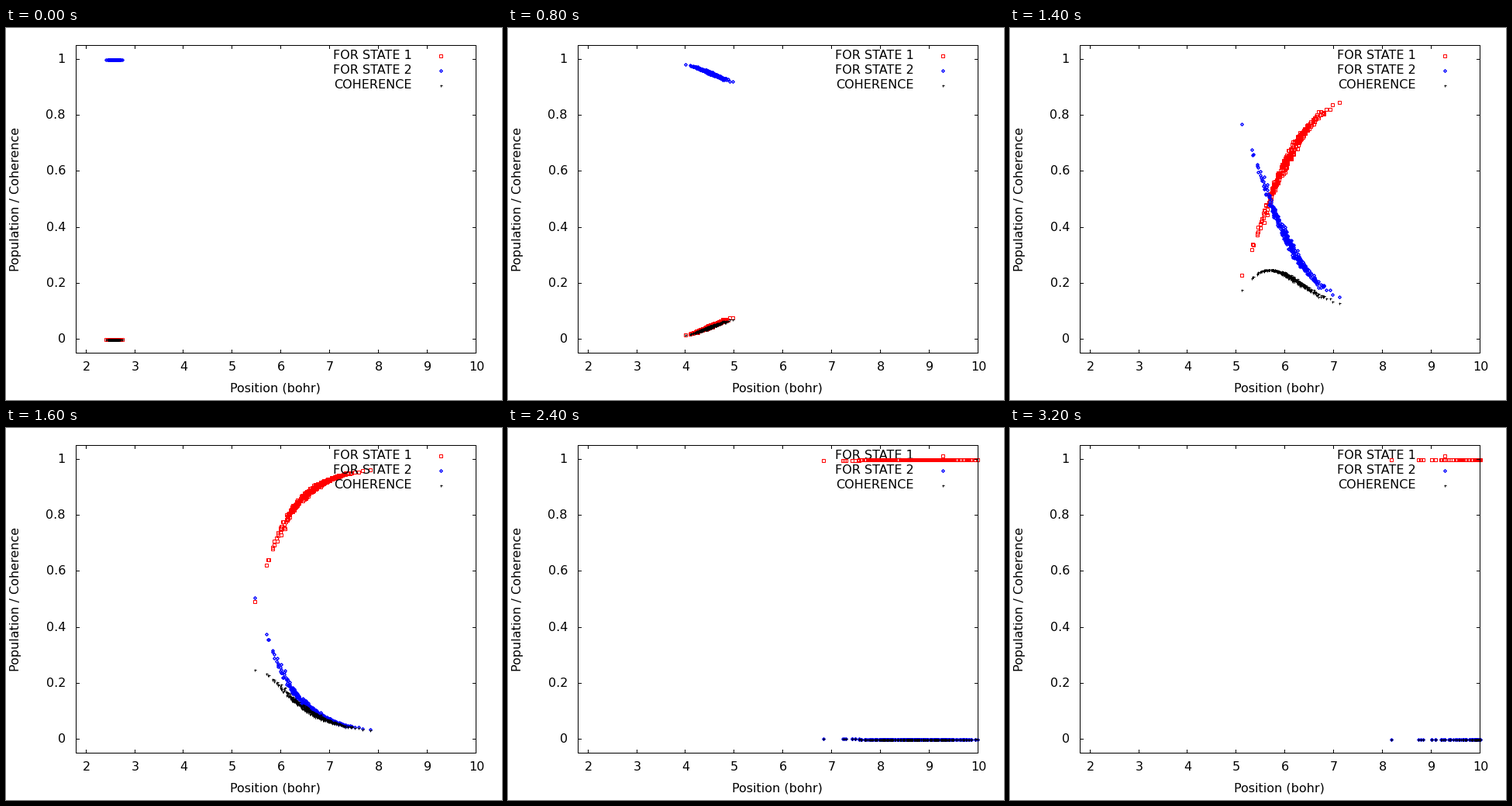
Recreate the animation shown at these times as a matplotlib script. Size 640x480 px, loop 3300 ms.

```python
import numpy as np
import matplotlib.pyplot as plt
from matplotlib.animation import FuncAnimation

FRAMES, STEP = 33, 100
PX = 72 / 80  # one pixel in points
LEFT, RIGHT, TOP, BOTTOM = 90.5, 606.5, 22.5, 419.5
X_MIN, X_MAX, Y_MIN, Y_MAX = 1.8, 10, -0.05, 1.05

plt.rcParams["font.family"] = "DejaVu Sans"
fig = plt.figure(figsize=(8, 6), dpi=80, facecolor="white")
ax = fig.add_axes([0, 0, 1, 1])
ax.set_xlim(0, 640)
ax.set_ylim(480, 0)
ax.axis("off")


def to_px(x, y):
    """Data values to the centre of the pixel they fall in."""
    px = LEFT + (x - X_MIN) * (RIGHT - LEFT) / (X_MAX - X_MIN)
    py = BOTTOM - (y - Y_MIN) * (BOTTOM - TOP) / (Y_MAX - Y_MIN)
    return np.floor(px) + 0.5, np.floor(py) + 0.5


# Each trajectory keeps its place z in the packet: one straggler at 0,
# a bell-shaped crowd, and the leader at 1.
rng = np.random.default_rng(4)
crowd = rng.normal(0.47, 0.165, 300)
z = np.r_[0, crowd[(crowd > 0.085) & (crowd < 1)], 1]
noise = rng.normal(0, 0.05, z.size)


def state(t):
    """Positions and state 1 populations at t seconds."""
    # Both ends of the packet settle into steady motion.
    lo = 2.74 + 1.70 * t - 0.33 * np.exp(-(t / 0.75) ** 2)
    hi = 2.12 + 3.56 * t + 0.61 * np.exp(-(t / 0.3) ** 2)
    x = lo + z * (hi - lo)

    # Log-odds rise with time; the slow tail lags behind.
    middle = np.interp(t, [0, 0.8, 1.2, 1.6, 2.0, 3.2],
                       [-10, -3.12, -0.87, 1.98, 5.1, 13])
    lag = 2.6 - 4.4 * np.exp(-1.17 * z)
    odds = middle + min(0.69 * t, 1.1) * lag + noise
    p = 1 / (1 + np.exp(-odds))
    seen = x <= X_MAX
    return x[seen], p[seen]


def label(x, y, text, ha="center", **kw):
    ax.text(x, y, text, ha=ha, va="baseline", fontsize=16 * PX, **kw)


def stroke(xs, ys):
    ax.plot(xs, ys, color="black", lw=PX, zorder=20, snap=False,
            solid_capstyle="projecting", solid_joinstyle="miter")


# Axes
stroke([LEFT, RIGHT, RIGHT, LEFT, LEFT], [TOP, TOP, BOTTOM, BOTTOM, TOP])
for v in range(2, 11):
    x, _ = to_px(v, 0)
    stroke([x, x], [BOTTOM, BOTTOM - 4])
    stroke([x, x], [TOP, TOP + 4])
    label(x + 0.5, 442.4, str(v))
for v in np.arange(6) / 5:
    _, y = to_px(2, v)
    stroke([LEFT, LEFT + 4], [y, y])
    stroke([RIGHT, RIGHT - 4], [y, y])
    label(77, y + 4.4, f"{v:g}", ha="right")
label(347.5, 470, "Position (bohr)")
label(17, 220.5, "Population / Coherence", rotation=90, rotation_mode="anchor")

# Series, each with its key entry painted just before its points
SERIES = [
    ("FOR STATE 1", "red", "s", 4, 1),
    ("FOR STATE 2", "blue", "D", 2.6, 1.3),
    ("COHERENCE", "black", "+", 3, 1),
]
clouds = []
for i, (name, color, marker, size, width) in enumerate(SERIES):
    y = 35.5 + 19 * i
    style = dict(ls="none", marker=marker, ms=size * PX, mfc="none", mec=color,
                 mew=width * PX, zorder=5 + 2 * i, snap=False)
    label(523.4, y + 4.4, name, ha="right", zorder=4 + 2 * i)
    ax.plot([560.5], [y], **style)
    clouds += ax.plot([], [], **style)


def draw(i):
    x, p = state(i * STEP / 1000)
    for cloud, y in zip(clouds, (p, 1 - p, p * (1 - p))):
        cloud.set_data(*to_px(x, y))
    return clouds


anim = FuncAnimation(fig, draw, frames=FRAMES, interval=STEP, repeat=True,
                     repeat_delay=0, blit=False)
plt.show()
```
